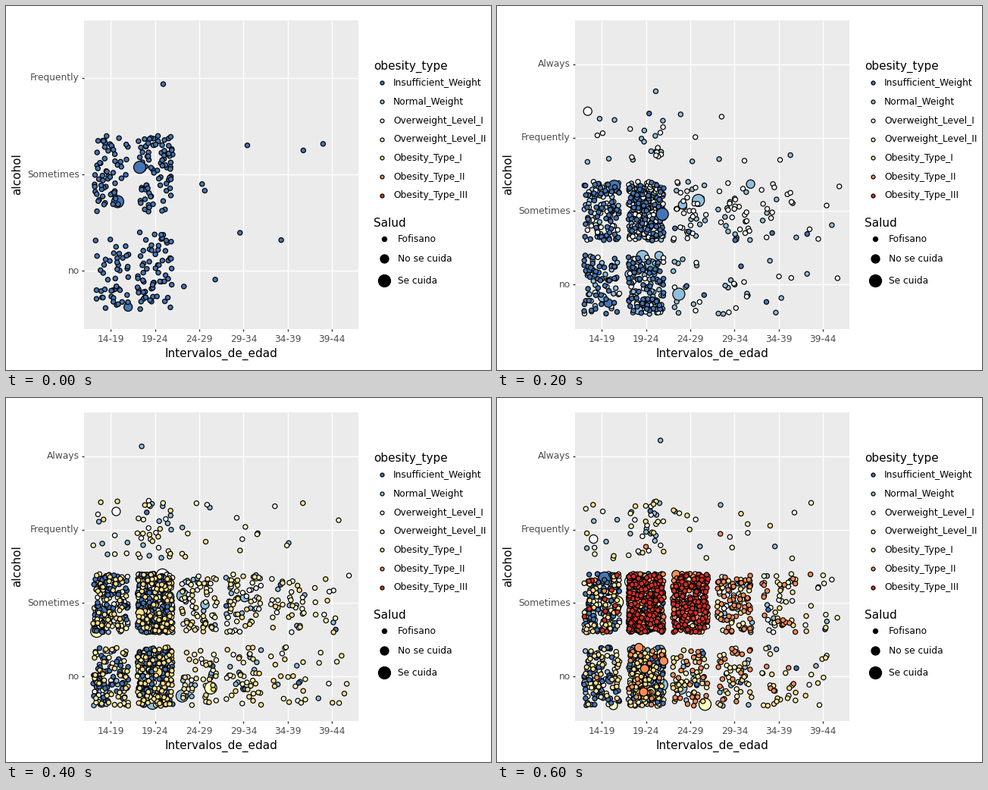
These frames come from a looping animation (640x480 px, 700 ms). A matplotlib script:

```python
import numpy as np
import matplotlib.pyplot as plt
from matplotlib.animation import ArtistAnimation
from matplotlib.patches import Rectangle

W, H, DPI = 640, 480, 100
LEFT, RIGHT, TOP, BOTTOM = 103.3, 465.3, 18.5, 425.5
JITTER = 0.4
SMALL, MID, BIG = 2, 4, 6
ROWS = ["Always", "Frequently", "Sometimes", "no"]
AGES = ["14-19", "19-24", "24-29", "29-34", "34-39", "39-44"]

# name, color, people per row, (share 14-19, share 19-24, spread of the
# older groups), (middle dots, big dots)
KINDS = [
    ("Insufficient_Weight", "#4575b4", (0, 1, 154, 117), (.41, .56, 3), (1, 2)),
    ("Normal_Weight", "#91bfdb", (1, 18, 161, 107), (.22, .57, 1.8), (7, 4)),
    ("Overweight_Level_I", "#fcfefe", (0, 16, 224, 50), (.17, .56, 2.2), (1, 1)),
    ("Overweight_Level_II", "#ffffbf", (0, 19, 143, 128), (.17, .46, 2.6), (2, 3)),
    ("Obesity_Type_I", "#fee090", (0, 14, 172, 165), (.22, .48, 2.2), (2, 0)),
    ("Obesity_Type_II", "#fc8d59", (0, 2, 224, 71), (.01, .33, 1.5), (11, 0)),
    ("Obesity_Type_III", "#d73027", (0, 0, 323, 1), (.04, .5, .3), (0, 0)),
]
STACK = [1, 2, 3, 0, 4, 5, 6]  # kinds from bottom to top

plt.rcParams["font.family"] = "DejaVu Sans"
fig = plt.figure(figsize=(W / DPI, H / DPI), dpi=DPI, facecolor="white")
ax = fig.add_axes([0, 0, 1, 1])
ax.set(xlim=(0, W), ylim=(H, 0))
ax.axis("off")


def age_groups(n, teen, core, spread):
    """Split n people over the age groups, with a bell-shaped older tail."""
    tail = np.exp(-(np.arange(len(AGES) - 2) / spread) ** 2)
    shares = np.r_[teen, core, (1 - teen - core) * tail / tail.sum()]
    return np.searchsorted(np.cumsum(shares)[:-1], (np.arange(n) + 0.5) / n)


def make_people():
    """Columns: kind, row, age group, dot size."""
    rng = np.random.default_rng(7)
    people = []
    for kind in STACK:
        _, _, counts, ages, (mids, bigs) = KINDS[kind]
        row = np.repeat(np.arange(len(ROWS)), counts)
        age = np.concatenate([age_groups(n, *ages) for n in counts])
        size = np.full(len(row), SMALL)
        pick = rng.permutation(len(row))[:mids + bigs]
        size[pick] = [MID] * mids + [BIG] * bigs
        people.append(np.column_stack(
            [np.full(len(row), kind), row, age, size]))
    return np.vstack(people).astype(int)


def centers(lo, hi, n):
    """Middles of n categories on a padded discrete axis, and their spacing."""
    gap = (hi - lo) / (n + 0.2)
    return lo + gap * (0.6 + np.arange(n)), gap


def dots(x, y, size, color):
    area = np.pi * (np.asarray(size) + 0.5) ** 2
    return ax.scatter(x, y, s=area, c=color, edgecolors="black",
                      linewidths=0.5 * np.sqrt(np.pi), zorder=3)


def label(x, y, text, size=8.8, color="black", **kw):
    return ax.text(x, y, text, size=size, color=color, **kw)


def line(x, y, color):
    return ax.plot(x, y, color=color, lw=1, zorder=1,
                   solid_capstyle="butt")[0]


PEOPLE = make_people()
COLORS = np.array([kind[1] for kind in KINDS])
X, X_GAP = centers(LEFT, RIGHT, len(AGES))


def draw_base():
    ax.add_patch(Rectangle((LEFT, TOP), RIGHT - LEFT, BOTTOM - TOP,
                           fc="#ebebeb", ec="none", zorder=0))
    for x, age in zip(X, AGES):
        line([x, x], [TOP, BOTTOM], "white")
        line([x, x], [BOTTOM, BOTTOM + 3.8], "#333333")
        label(x, 443, age, color="#4d4d4d", ha="center")
    label((LEFT + RIGHT) / 2, 463, "Intervalos_de_edad", 11, ha="center")
    label(22, (TOP + BOTTOM) / 2, "alcohol", 11, rotation=90,
          ha="right", va="center")

    label(485, 84, "obesity_type", 11)
    for i, (name, color, *_) in enumerate(KINDS):
        y = 101.3 + 24.75 * i
        dots([496], [y], 1.5, color)
        label(511, y + 3.7, name)
    label(485, 291, "Salud", 11)
    for name, size, y in [("Fofisano", SMALL, 307.2),
                          ("No se cuida", MID, 333.2),
                          ("Se cuida", BIG, 362.2)]:
        dots([499.2], [y], size, "black")
        label(517, y + 4, name)


def draw_step(step):
    kind, row, age, size = PEOPLE[PEOPLE[:, 0] <= step].T
    first = row.min()  # rows without people are dropped
    names = ROWS[first:]
    rows, gap = centers(TOP, BOTTOM, len(names))

    art = []
    for y, name in zip(rows, names):
        art += [line([LEFT, RIGHT], [y, y], "white"),
                line([LEFT - 3.8, LEFT], [y, y], "#333333"),
                label(LEFT - 6.5, y, name, color="#4d4d4d", ha="right",
                      va="center")]

    rng = np.random.default_rng(40 + step)
    dx, dy = rng.uniform(-JITTER, JITTER, (2, len(kind)))
    art.append(dots(X[age] + dx * X_GAP, rows[row - first] + dy * gap,
                    size, COLORS[kind]))
    return art


draw_base()
anim = ArtistAnimation(fig, [draw_step(i) for i in range(len(KINDS))],
                       interval=100, repeat=True, repeat_delay=0)
plt.show()
```
